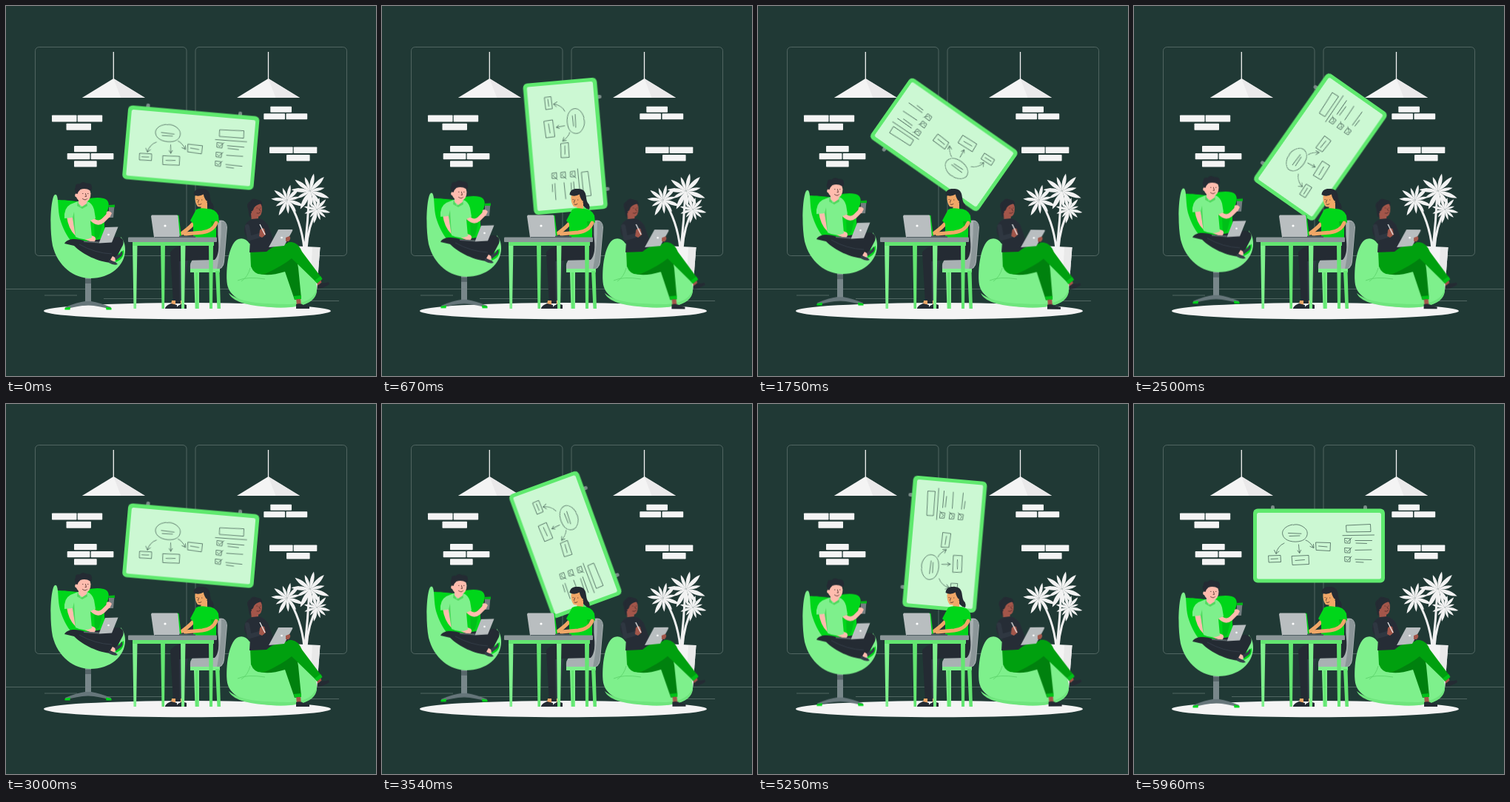
An HTML page for the animation above (6 s loop, 500 by 500 pixels).

```html
<!DOCTYPE html>
<html lang="en">
<head>
<meta charset="utf-8">
<title>Team at work</title>
<style>
  html, body { margin: 0; width: 100%; height: 100%; overflow: hidden; background: #203935; }
  svg { display: block; width: 100vw; height: 100vh; }
  .line { fill: none; stroke: #5d716e; stroke-width: .8; }
  .pale { fill: #f4f4f4; }
  .mint { fill: #7ef08c; }
  .leaf { fill: #63e671; }
  .vivid { fill: #00d61a; }
  .dark { fill: #242b33; }
  .steel { fill: #b9bec0; }
  .grey { fill: #8b9698; }
  .ink { fill: none; stroke: #3f5a50; stroke-width: .75; stroke-linecap: round; stroke-linejoin: round; }
  .face { fill: none; stroke: #4a2a28; stroke-width: .8; stroke-linecap: round; }
  .limb { fill: none; stroke-linecap: round; stroke-linejoin: round; }
  .rose { fill: #ffbcae; }
  .tan { fill: #f0a767; }
  .brown { fill: #a3564a; }

  /* the board turns in 5 degree steps, 24 per second, about a point just above its middle */
  .board { transform-origin: 250px 189.2px; animation: spin 3s steps(72, end) -5ms infinite; }
  .float { animation: float 6s linear infinite; }
  .sway { transform-origin: 345px 335px; animation: sway 6s linear infinite; }
  @keyframes spin { from { transform: rotate(5deg); } to { transform: rotate(365deg); } }
  @keyframes float { 50% { transform: translateY(-10px); } }
  @keyframes sway {
    0%, 100% { transform: rotate(0); }
    25% { transform: rotate(1deg); }
    75% { transform: rotate(-1deg); }
  }
</style>
</head>
<body>
<svg viewBox="0 0 500 500">
  <defs>
    <g id="lamp">
      <path d="M0 62V99" stroke="#f3f3f3" stroke-width="1.3"/>
      <path class="pale" d="M-42.5 124L0 98L42.5 124Z"/>
      <path d="M0 98L42.5 124H10Z" fill="#eae9ea"/>
    </g>
    <path id="blade" d="M0 0C-2 -6 -5 -15 0 -26C5 -15 2 -6 0 0Z"/>
    <g id="check" class="ink">
      <path d="M-.5 0L6.8 .4L6.5 6.7L-.2 6.3Z"/>
      <path d="M1 3L3 5L8.5 -.5"/>
    </g>
  </defs>

  <!-- room -->
  <g class="line">
    <rect x="39.5" y="55.5" width="204.5" height="282" rx="5"/>
    <rect x="256" y="55.5" width="204.5" height="282" rx="5"/>
    <path d="M0 382.5H500M52 391H96M132 395.5H214M404 398.5H450"/>
  </g>
  <use href="#lamp" x="145.3"/>
  <use href="#lamp" x="354.5"/>
  <g id="bricks" class="pale"></g>
  <ellipse class="pale" cx="245" cy="412.2" rx="194" ry="11.1"/>

  <!-- plant -->
  <g>
    <path d="M403 328Q399 290 381 263M404 328Q408 290 410 251M406 328Q408 298 420 276" fill="none" stroke="#f0f0f0" stroke-width="3"/>
    <g id="plant" fill="#f2f2f2"></g>
    <path class="pale" d="M382 324L424.5 326L420 384H388Z"/>
    <path d="M414 326L424.5 326L420 384H411Z" fill="#e9e9e9"/>
  </g>

  <!-- board -->
  <g class="board">
    <rect x="185" y="137" width="5" height="7" rx="2.4" fill="#7b8b88"/>
    <rect x="310" y="137" width="5" height="7" rx="2.4" fill="#7b8b88"/>
    <rect x="161" y="141.5" width="178" height="100" rx="6" fill="#5fe96e"/>
    <rect x="166" y="147" width="168" height="89.5" rx="2.5" fill="#ccf8d3"/>
    <g class="ink">
      <path d="M214 163C204 165 199 171 201 177C203 185 216 188 226 185C235 182 237 172 230 167C225 163 219 162 215 163.5"/>
      <path d="M208.500 174.500L226 175.200M210 178.500L224 178"/>
      <path d="M203 188Q194 192 192 202M189.500 197.500L192 202.500L196 199"/>
      <path d="M222.500 190L223.500 201M221 198L223.700 201.500L225.500 197.500"/>
      <path d="M232 184Q238 186 242.500 194M238 192.500L243 194.500L242.500 189.500"/>
      <path d="M182 205L198 204.500L198.500 213.500L182.500 214Z M185 209.500L194.500 209"/>
      <path d="M213.500 205.500L236 204.500L236.500 216.500L214.500 217.500Z M218 211.500L230.500 210.500"/>
      <path d="M246 187L265.500 187.500L265 198.500L246.500 197.500Z M249.500 192L261 193"/>
      <path d="M287 164L319.500 162.500L320 172.500L287.500 173Z M282 177.700L324.500 177"/>
      <path d="M299 184.500L321.500 184.500M300 188L314.500 188.500M299 197.500L321 197M299 210L321 210.500M300 213.500L310 214"/>
    </g>
    <use href="#check" x="285.500" y="181.500"/>
    <use href="#check" x="285.500" y="194.500"/>
    <use href="#check" x="285.500" y="206.500"/>
  </g>

  <!-- man in the egg chair -->
  <g class="float">
    <rect x="107" y="365" width="8" height="39" fill="#78878a"/>
    <rect x="107" y="369" width="8" height="6" fill="#57666a"/>
    <path d="M80 407Q97 400 107 399H115Q127 401 142 407L141 410Q126 405 111 404.500Q95 405 81 410Z" fill="#66767a"/>
    <path class="vivid" d="M79.500 408L87 406.500L86.500 410.500H79.500ZM135 406.500L142.500 408V410.500H135.500Z"/>
    <path class="vivid" d="M67 262C80 262 86 263 97 264C108 261 121 257 132 260C140 262 140 270 137 277C131 292 131 301 142 324L98 340L71 320Z"/>
    <path d="M136 277Q130 293 126 312L120 316L119 292Q130 290 136 277Z" fill="#00c018"/>
    <path class="mint" d="M66 255C61 257 58 298 63 324C70 352 92 368 114 368C142 368 162 350 161 328C161 321 158 315 155 312C154 325 141 339 119 336C93 331 80 311 73 288C70 276 71 263 69 257Q68 254 66 255Z"/>
    <path class="vivid" d="M150 336L159 330Q160 342 148 346Z"/>

    <path class="dark" d="M79 321C83 313 97 314 108 318L150 312Q161 313 158 323L148 342L143 347C125 346 104 336 92 324Z"/>
    <path d="M99 322Q120 334 143 335" fill="none" stroke="#39434e" stroke-width=".8"/>
    <path class="rose" d="M144 338L149 341L146 346L141 343Z"/>
    <path d="M147 339L154 335L156 331Q159 334 156 338L148 344ZM139 343L148 346L151 349Q146 351 139 347Z" fill="#343e49"/>
    <path class="limb" d="M86 284Q88 299 96 307L117 315" stroke="#ffbcae" stroke-width="8"/>
    <path class="limb" d="M116 288Q124 296 131 290L140 281" stroke="#ffbcae" stroke-width="6"/>
    <path class="mint" d="M97 264L110 264Q117 267 119 275L121 287L114 290L116 313Q105 318 94 312L90 286L79 287Q78 273 87 268Z"/>
    <path d="M90 286L92 278L94 312ZM97 264L101 272L109 265L110 270L103 274L96 270Z" fill="#51d95f"/>
    <path class="rose" d="M98 258H109V267L103 271L98 267Z"/>
    <g transform="translate(-.5 1.5)">
      <path class="rose" d="M95 250Q95 241 105 241Q114 242 115 252Q115 262 107 264Q97 264 95 255Z"/>
      <circle class="rose" cx="96" cy="254.500" r="2.400"/>
      <path class="dark" d="M95 252Q92 247 94.500 243Q94 238 100 239Q104 234.500 109 238Q117 237.500 116.500 244Q117 248 114.500 248Q108 244 101 246.500Q98 249 97 252.500Z"/>
      <path class="face" d="M104 252h.5M111 252h.5M108 252L109 256H107.500M104 259Q108 262 110 259"/>
    </g>
    <path d="M139 270L146.500 270L145 286H139Z" fill="#737d80"/>
    <path d="M139 269L147 268.500V272H139Z" fill="#00b817"/>
    <path class="rose" d="M136 278Q140 276 143 280L140 286L135 284Z"/>
    <path class="steel" d="M134 299L151.500 298.500L143 319.500L125.500 320.500Z"/>
    <path d="M105 317.500L126 318.500L125.500 320.500L105 319Z" fill="#5e696d"/>
    <circle cx="138.500" cy="309" r="1.300" fill="#fff"/>
  </g>

  <!-- woman at the table -->
  <path d="M286 290Q298 287 299 299L295 346Q294 356 284 356H249Q248 346 253 342H280Q288 328 286 290Z" fill="#a9b1b3"/>
  <path d="M291 291Q299 290 298 301L294 346Q292 355 285 356Q291 325 291 291Z" fill="#8b9698"/>
  <path class="mint" d="M249 355H289V360H261V409H255.500L254 360H249Z"/>
  <path class="leaf" d="M283 358H288.500L290 409H285.500ZM256 360H259L259.500 409H256.500Z"/>
  <path class="dark" d="M252 309H286Q290 335 282 343L240 344L236 402H226L222 333Q227 324 252 321Z"/>
  <path d="M246 344Q241 373 241 402H235L234 345Z" fill="#303944"/>
  <path class="tan" d="M224 398H229V404H223ZM236 398H241V405H236Z"/>
  <path class="dark" d="M215 408Q217 404 223 402L231 404V409H215ZM230 408Q233 404 238 402L244 404V409H230Z"/>
  <path class="dark" d="M258 253C258 247 267 245 272 249C277 253 275 261 278 266Q282 269 280 275Q272 274 268 262Z"/>
  <path class="tan" d="M264 266H272V277H263Z"/>
  <path class="tan" d="M255.500 257Q259 252 267 253Q273 259 271.500 266Q267 273 259 271Q255 266 255.500 257Z"/>
  <path class="dark" d="M253.500 255Q254 248 261 247Q270 246 274 254L273 264L270.500 263Q267 258 267 254.500Q260 258.500 253.500 255Z"/>
  <path class="face" d="M258 261.500h.4M264.500 262h.4M260.500 262L259.500 265.500M260 268Q262 269.500 264 267.500"/>
  <path class="limb" d="M257 289Q251 298 238 307" stroke="#f0a767" stroke-width="5"/>
  <path class="vivid" d="M257 275Q262 272 272 274Q283 274 287 283L288 292L284 296V313H253V294L249 290Z"/>
  <path d="M277 291L288 291L284 298Q276 306 265 306L278 299Z" fill="#00b817"/>
  <path class="limb" d="M284 293Q280 304 265 306L242 308" stroke="#f0a767" stroke-width="5"/>

  <!-- table -->
  <path class="leaf" d="M209 322H215L214 409H210.500ZM274 322H280L279 409H275Z"/>
  <path class="mint" d="M171 322H177.500L176 409H172.500ZM236 322H242.500L241 409H237Z"/>
  <rect class="leaf" x="171" y="319" width="110" height="5"/>
  <rect class="grey" x="165" y="312.500" width="120" height="6.500" rx="1"/>
  <path class="vivid" d="M231 282.500L233.500 283L237 312H233Z"/>
  <path class="steel" d="M197 282.500H231Q232 282.500 232.500 284L235 312.500H200L196 284Z"/>
  <path d="M234 310.500L256 311V313H201V312H234Z" fill="#4f5d62"/>
  <circle cx="215" cy="297" r="1.600" fill="#fff"/>

  <!-- bean bag -->
  <path class="mint" d="M314 315C303 319 297 347 298.500 373C300 394 323 404 358 407C394 410 420 402 420 383C421 367 405 353 391 345L329 321Q323 312 314 315Z"/>
  <path d="M301 388C320 403 350 402 380 403C405 403 417 394 420 382C421 404 393 409 358 407C324 405 306 399 301 388Z" fill="#6fe57d"/>
  <path d="M313 371Q326 365 350 369M330 354Q327 366 318 372" fill="none" stroke="#62d870" stroke-width="1"/>

  <!-- woman on the bean bag -->
  <g class="sway">
    <path class="brown" d="M392 394H398L399 406H393ZM419 371L425 369L427 376L422 379Z"/>
    <path class="dark" d="M392 403Q398 401 402 404L410 406V409H392ZM421 378L426 374Q431 375 436 373L437 376Q430 381 422 382Z"/>
    <path d="M334 338Q362 333 384 337Q394 341 395 354L399 395L390 397L377 359Q351 367 339 360Z" fill="#00810e"/>
    <path d="M330 331L353 330Q375 318 386 319Q395 320 400 332L427 368L420 374L386 341Q374 351 350 362Q336 365 331 352Z" fill="#00a00f"/>
    <path d="M389 392L399 391V396H390ZM417 371L425 365L427.500 369L420 375Z" fill="#00c117"/>
    <g transform="translate(-1 0)">
      <path class="dark" d="M328 274Q325 267 331 264Q334 258 341 262Q348 262 347 270L337 287L330 285Z"/>
      <path class="brown" d="M332 280L342 279V291L333 292Z"/>
      <path class="brown" d="M332 272Q334 265 342 265Q347 267 347 274Q347 284 341 285Q333 284 332 276Z"/>
      <path class="dark" d="M331 278Q328 266 337 262Q345 261 347 267Q339 268 336 273Q335 278 331 278Z"/>
      <path class="face" d="M340 273h.4M345 273h.3M343 274L344.500 277M340 280Q343 281 344.500 279"/>
    </g>
    <path d="M332 288L342 287Q349 289 354 296L362 318L357 328L352 332L329 333L330 317Q319 309 323 297Q325 291 332 288Z" fill="#262d36"/>
    <path class="limb" d="M326 298L329 314L346 309" stroke="#2f3741" stroke-width="6"/>
    <path class="limb" d="M351 298L358 320L378 318" stroke="#262d36" stroke-width="6"/>
    <path class="steel" d="M368 302H386.500Q388 302 387 304L376 324L355 326Z"/>
    <circle cx="372.500" cy="313" r="1.300" fill="#fff"/>
    <path class="brown" d="M343 303Q345 299 349 301L351 309L346 313L342 311ZM378 313L383 311Q386 314 382 318L378 318Z"/>
    <path d="M343 295L350 309" stroke="#f3f3f3" stroke-width="1.200"/>
  </g>
</svg>

<script>
  const make = (parent, name, attrs) => {
    const el = document.createElementNS("http://www.w3.org/2000/svg", name);
    for (const key in attrs) el.setAttribute(key, attrs[key]);
    document.getElementById(parent).append(el);
  };

  // rows of bricks: height, brick width, then x and y of each brick
  const walls = [
    [9, 33.5, [62, 147.5], [96.7, 147.5], [81.5, 158.7]],
    [8.3, 30.7, [92, 189], [82.7, 199], [114.7, 199], [92, 209.2]],
    [8, 28.7, [357.3, 135.7], [348.3, 145.2], [378.5, 145.2]],
    [8.5, 31.6, [356, 190.5], [388.7, 190.5], [379, 201]]
  ];
  for (const [height, width, ...spots] of walls)
    for (const [x, y] of spots) make("bricks", "rect", { x, y, width, height, rx: .8 });

  // fans of pointed leaves
  const fans = [[380, 262, .9, 11], [411, 250, 1.05, 11], [420, 275, .72, 12]];
  for (const [x, y, size, count] of fans)
    for (let i = 0; i < count; i++) {
      const scale = size * (.88 + .15 * Math.sin(i * 2.4));
      make("plant", "use", {
        href: "#blade",
        transform: `translate(${x} ${y}) rotate(${i * 360 / count + 12}) scale(${scale})`
      });
    }
</script>
</body>
</html>
```
